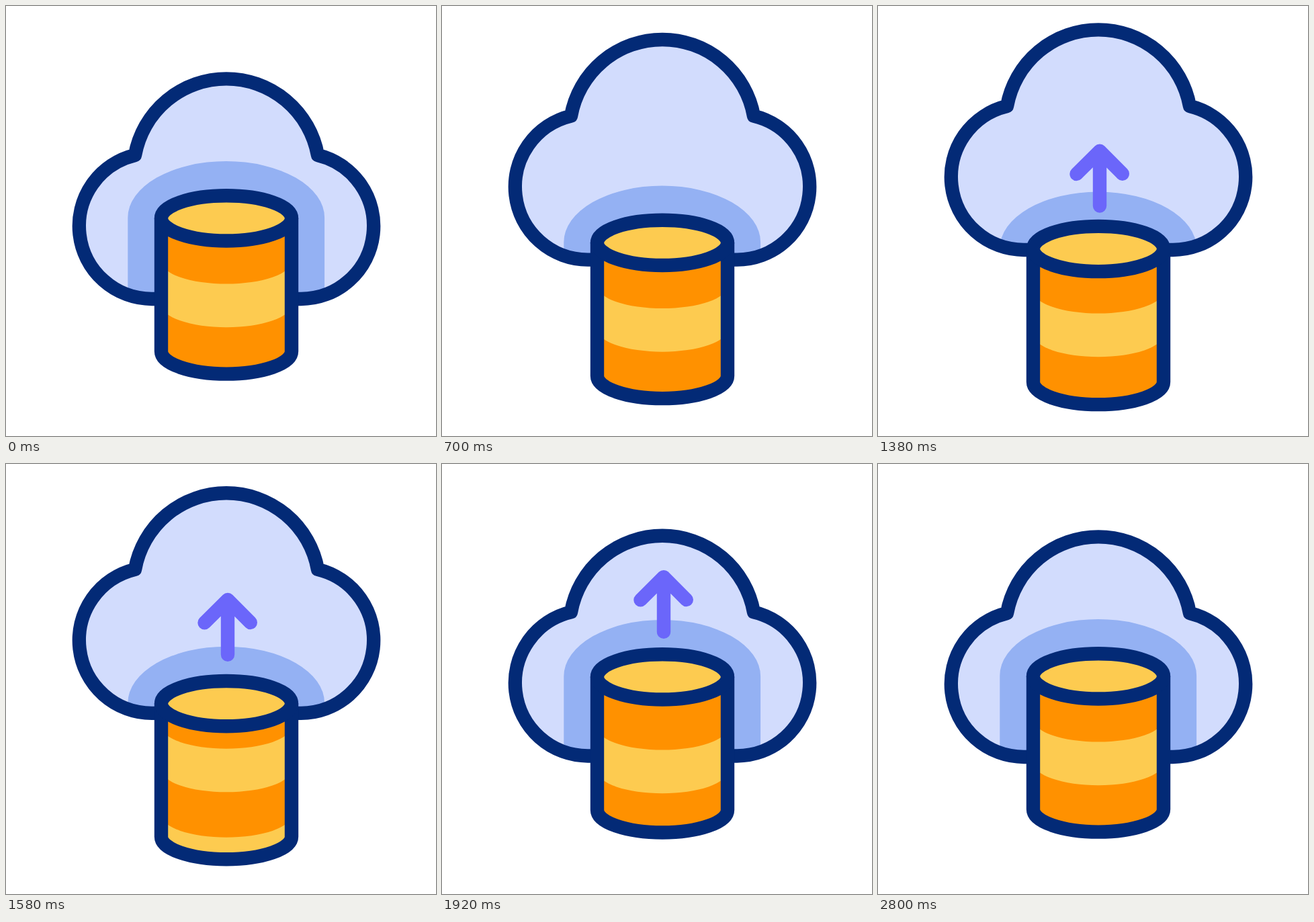
Write an HTML page that moves like this. It is 640 px wide and 640 px high and loops after 3.02 s.

```html
<!DOCTYPE html>
<html lang="en">
<head>
<meta charset="utf-8">
<title>Cloud storage</title>
<style>
  html, body { margin: 0; width: 100%; height: 100%; overflow: hidden; background: #fff; }
  svg { display: block; width: 100%; height: 100%; }
  .line { fill: none; stroke: #032a76; stroke-width: 20.4; stroke-linejoin: round; }
  #arrow { fill: none; stroke: #6b66fa; stroke-width: 20.4; stroke-linecap: round; stroke-linejoin: round; }
</style>
</head>
<body>
<svg viewBox="0 0 640 640">
  <defs>
    <path id="cloudShape" d="M217 436A108.5 108.5 0 0 1 192 222A138.2 138.2 0 0 1 464 222A108.5 108.5 0 0 1 439 436Z"/>
    <path id="bodyShape" d="M231 316V514A97 33.6 0 0 0 425 514V316Z"/>
    <path id="band" fill="#fdcb50" d="M231 380A97 33.6 0 0 0 425 380V444.6A97 33.6 0 0 1 231 444.6Z"/>
    <clipPath id="cloudClip"><use href="#cloudShape"/></clipPath>
    <clipPath id="bodyClip"><use href="#bodyShape"/></clipPath>
  </defs>

  <g id="cloud">
    <use href="#cloudShape" fill="#d2dcfd"/>
    <g clip-path="url(#cloudClip)">
      <path id="shade" fill="#94b1f3" d="M181.3 600V315A146.4 84 0 0 1 474.1 315V600Z"/>
    </g>
    <use href="#cloudShape" class="line"/>
  </g>

  <path id="arrow" d="M330 249.8V168M295.5 202.3L330 168L363.8 202"/>

  <g id="drum">
    <use href="#bodyShape" fill="#ff9100"/>
    <g clip-path="url(#bodyClip)">
      <g id="bands"><use href="#band"/><use href="#band" y="132"/></g>
    </g>
    <use href="#bodyShape" class="line"/>
    <ellipse cx="328" cy="315.9" rx="97" ry="33.6" fill="#fdcb50"/>
    <ellipse cx="328" cy="315.9" rx="97" ry="33.6" class="line"/>
  </g>
</svg>
<script>
const LOOP = 3020;
const $ = id => document.getElementById(id);
const ramp = (t, from, to) => Math.min(1, Math.max(0, (t - from) / (to - from)));
const easeOut = (u, n) => 1 - (1 - u) ** n;
const easeInOut = (u, n) => u < .5 ? (2 * u) ** n / 2 : 1 - (2 - 2 * u) ** n / 2;
const moveY = (id, y) => $(id).setAttribute('transform', `translate(0 ${y})`);

function draw(t) {
  const spread = easeOut(ramp(t, 200, 1330), 2.75) - easeInOut(ramp(t, 1335, 2080), 3.7);
  const cloudY = -73 * spread, drumY = 45.6 * spread;
  moveY('cloud', cloudY);
  moveY('shade', drumY - cloudY);
  moveY('drum', drumY);
  moveY('bands', -132 * easeInOut(ramp(t, 1320, 2080), 2.05));
  moveY('arrow', 48 * (1 - easeInOut(ramp(t, 1310, 1965), 2.85)));
  $('arrow').setAttribute('opacity', ramp(t, 1010, 1260) - ramp(t, 2380, 2600));
}

function tick() {
  draw(performance.now() % LOOP);
  requestAnimationFrame(tick);
}
tick();
</script>
</body>
</html>
```
